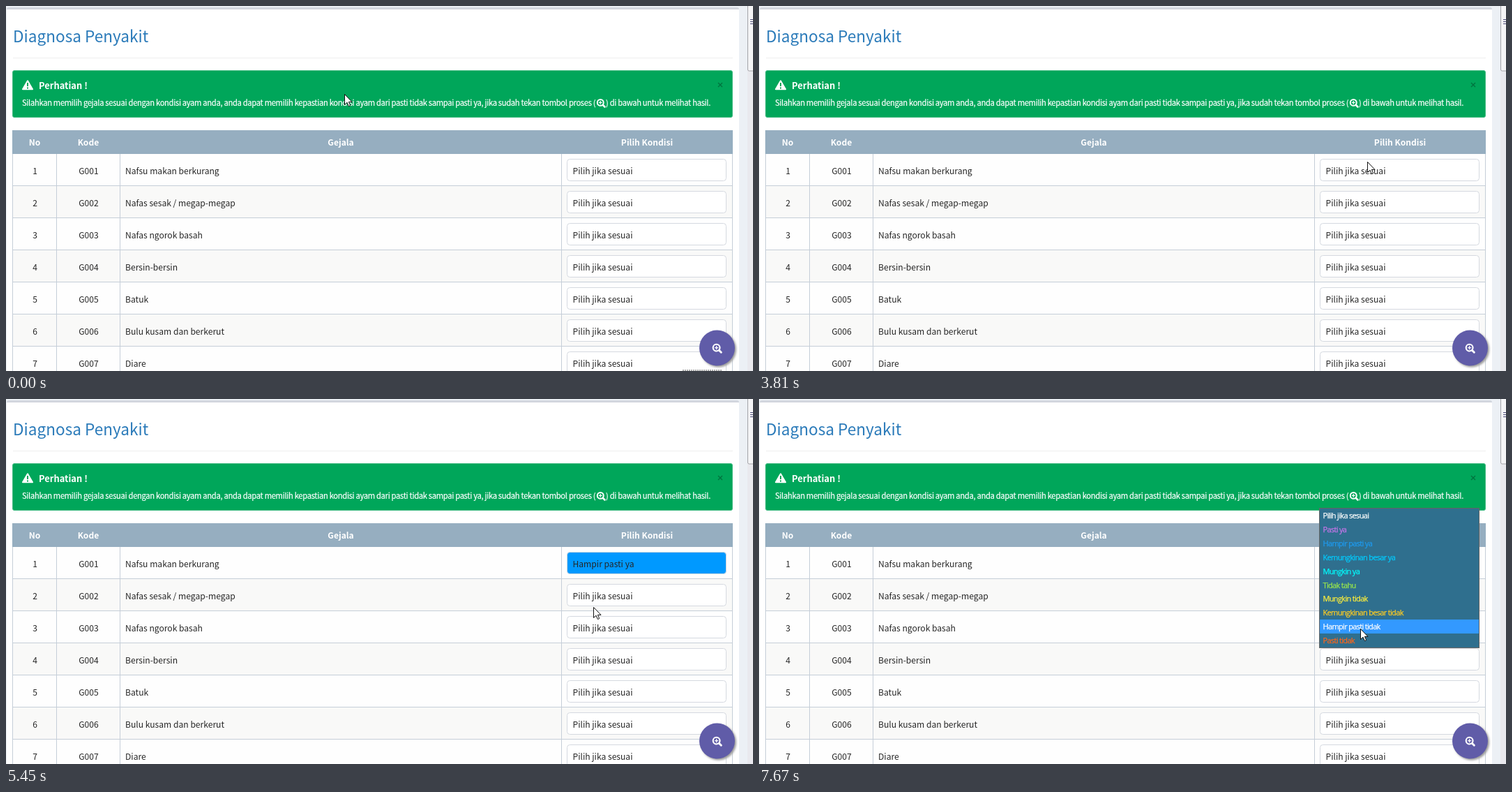
Animation of 1071 by 523 pixels, one loop 7990 ms. Source, as an HTML page:

```html
<!DOCTYPE html>
<html lang="id">
<head>
<meta charset="utf-8">
<title>Diagnosa</title>
<style>
html, body { margin: 0; width: 100%; height: 100%; overflow: hidden; background: #ecf0f5; }
svg { display: block; width: 100%; height: 100%; }
text { font: 12.1px "Noto Sans CJK JP", "Noto Sans CJK SC", "Noto Sans", sans-serif; fill: #262626; white-space: pre; }
.title { font-size: 22.6px; fill: #2a7ab9; }
.head { font-weight: bold; fill: #fff; }
.mid { text-anchor: middle; }
.note { font-size: 11.2px; letter-spacing: -.315px; fill: #fff; stroke: #fff; stroke-width: .2px; }
.opt { font: 11px "Open Sans", "Noto Sans", sans-serif; letter-spacing: -.67px; fill: currentColor; stroke: currentColor; stroke-width: .25px; }
</style>
</head>
<body>
<svg id="stage" viewBox="0 0 1071 523" xmlns="http://www.w3.org/2000/svg"></svg>
<script>
const LOOP = 7990, STEP = 78, ROW = 46, OPT = 19.9;
const NONE = 'Pilih jika sesuai';
const headings = ['No', 'Kode', 'Gejala', 'Pilih Kondisi'];
const edges = [9, 72, 163, 796, 1041];
const symptoms = ['Nafsu makan berkurang', 'Nafas sesak / megap-megap', 'Nafas ngorok basah',
  'Bersin-bersin', 'Batuk', 'Bulu kusam dan berkerut', 'Diare'];
const options = [
  [NONE, '#fff'], ['Pasti ya', '#c776ea'], ['Hampir pasti ya', '#1e9bf0'],
  ['Kemungkinan besar ya', '#0cf'], ['Mungkin ya', '#0ff'], ['Tidak tahu', '#9be84a'],
  ['Mungkin tidak', '#ffef3a'], ['Kemungkinan besar tidak', '#fc2'],
  ['Hampir pasti tidak', '#f93'], ['Pasti tidak', '#ff661a']];

// Pointer glides: start, duration, destination
const glides = [
  [70, 0, 418, 129], [290, 0, 432, 122],
  [1230, 470, 361, 228], [1700, 300, 437, 231],
  [2070, 330, 802, 237], [2620, 260, 240, 236], [3250, 560, 872, 223],
  [4360, 156, 875, 269], [4516, 234, 842, 298],
  [5450, 290, 850, 273], [6060, 340, 859, 404], [6400, 250, 857, 382],
  [7120, 0, 845, 379], [7270, 250, 862, 329]];

const lists = [{ from: 4010, to: 5450, top: 251 }, { from: 6850, to: LOOP, top: 157 }];

const rect = (x, y, w, h, fill, more = '') =>
  `<rect x="${x}" y="${y}" width="${w}" height="${h}" fill="${fill}" ${more}/>`;
const text = (x, y, str, cls = '', more = '') =>
  `<text x="${x}" y="${y}" class="${cls}" ${more}>${str}</text>`;
const path = (d, more) => `<path d="${d}" ${more}/>`;
const zoomIcon = (x, y, s) => `<g transform="translate(${x} ${y}) scale(${s})" fill="none" stroke="#fff">
  <circle cx="6" cy="6" r="4.8" stroke-width="2.1"/>
  <path d="M9.8 9.8 12.6 12.6" stroke-width="2.8" stroke-linecap="round"/>
  <path d="M3.5 6h5M6 3.5v5" stroke-width="1.3"/></g>`;

function page() {
  let s = rect(0, 0, 1071, 523, '#ecf0f5')
    + rect(1, 2, 1050, 530, '#d2d6de', 'rx="3"')
    + rect(1, 5, 1050, 518, '#fff')
    + rect(1063, 0, 8, 523, '#e9e9ee')
    + rect(1063.5, -4, 12, 97, '#f4f4f6', 'stroke="#a3a3a8" rx="2"')
    + path('M1067 19.5h4M1067 22.5h4M1067 25.5h4', 'stroke="#4c4c78"')
    + text(10, 52, 'Diagnosa Penyakit', 'title')
    + rect(10, 74, 1032, 1, '#eee')
    + rect(9.5, 92.5, 1032, 67, '#00a65a', 'stroke="#45bd86" rx="2.5"')
    + path('M31 107.2 38 119.3H24Z', 'fill="#fff" stroke="#fff" stroke-width="2" stroke-linejoin="round"')
    + path('M31 110v5M31 116.5v2', 'stroke="#00a65a" stroke-width="2"')
    + text(47, 119, 'Perhatian !', 'head', 'style="font-size:12.9px"')
    + path('M1021 110l6 6m0-6l-6 6', 'stroke="#00743f" stroke-width="1.4"')
    + text(23, 143, 'Silahkan memilih gejala sesuai dengan kondisi ayam anda, anda dapat memilih kepastian kondisi ayam dari pasti tidak sampai pasti ya, jika sudah tekan tombol proses (', 'note')
    + zoomIcon(846.7, 132.8, .93)
    + text(860, 143, ') di bawah untuk melihat hasil.', 'note')
    + rect(9, 178, 1033, 34, '#96aec0');
  headings.forEach((t, i) => s += text((edges[i] + edges[i + 1] + 1) / 2, 200, t, 'head mid'));
  symptoms.forEach((name, i) => {
    const y = 212 + i * ROW;
    s += rect(9, y, 1033, ROW, i % 2 ? '#f9f9f8' : '#fefefe')
      + rect(9, y + ROW - 1, 1033, 1, '#c5ced8')
      + text(41.5, y + 29, i + 1, 'mid')
      + text(118.5, y + 29, 'G00' + (i + 1), 'mid')
      + text(171, y + 29, name)
      + rect(804.5, y + 7.5, 228, 31, '#fff', `stroke="#d5d9e0" rx="4" id="box${i}"`)
      + text(812.5, y + 29, NONE, '', `id="val${i}"`);
  });
  edges.forEach(x => s += rect(x, 212, 1, 311, '#c5ced8'));
  return s + path('M970 522h57', 'id="dots" stroke="#555" stroke-dasharray="2 1"')
    + '<circle cx="1021.5" cy="492" r="25.5" fill="#999" filter="url(#soft)"/>'
    + '<circle cx="1019.5" cy="490" r="25.5" fill="#605ca8"/>'
    + zoomIcon(1012.5, 483.5, 1.02);
}

const listMarkup = () => '<g id="list">'
  + rect(.5, -.5, 229, 200, '#2f6f8e', 'stroke="#646464"')
  + rect(1, 0, 228, 20, '#39f', 'id="bar"')
  + options.map(([t], i) => text(5.5, 14 + Math.round(i * OPT), t, 'opt')).join('')
  + '</g>';

const stage = document.getElementById('stage');
stage.innerHTML = '<defs><filter id="soft" x="-30%" y="-30%" width="160%" height="160%"><feGaussianBlur stdDeviation="1.5"/></filter></defs>'
  + page() + listMarkup()
  + path('M.5 .5V15.5L4 12.2 6.4 17.6 8.7 16.6 6.4 11.4H11Z', 'id="arrow" fill="#fff" stroke="#111"')
  + path('M-3 -6.5h2.5l.5 .5 .5-.5H3M0-6V6M-3 6.5h2.5l.5-.5 .5 .5H3', 'id="beam" fill="none" stroke="#111"');

const [arrow, beam, list, bar, dots, box, val] =
  ['arrow', 'beam', 'list', 'bar', 'dots', 'box0', 'val0'].map(id => document.getElementById(id));
const labels = [...list.querySelectorAll('text')];
const show = (el, on) => el.setAttribute('visibility', on ? 'visible' : 'hidden');
const place = (el, x, y) => el.setAttribute('transform', `translate(${x} ${y})`);
const easeOut = u => 1 - (1 - u) ** 3;

function pointer(t) {
  let x = 485, y = 126;
  for (const [start, span, toX, toY] of glides) {
    if (t < start) break;
    const held = Math.floor((t - start) / STEP + .25) * STEP;
    const u = held >= span ? 1 : easeOut(held / span);
    x += (toX - x) * u;
    y += (toY - y) * u;
  }
  return [Math.round(x), Math.round(y)];
}

function draw(t) {
  const [x, y] = pointer(t);
  const overText = x > 168 && x < 308 && y > 225 && y < 250;
  show(arrow, !overText);
  show(beam, overText);
  place(arrow, x, y);
  place(beam, x + .5, y);

  const open = lists.find(l => t >= l.from && t < l.to);
  show(list, open);
  if (open) {
    place(list, 803, open.top);
    const row = Math.floor((y - open.top) / OPT);
    const active = row in options ? row : 0;
    bar.setAttribute('y', Math.round(active * OPT));
    labels.forEach((el, i) => el.style.color = i === active ? '#fff' : options[i][1]);
  }

  const chosen = t >= 5450;
  box.setAttribute('fill', chosen ? '#09f' : '#fff');
  val.textContent = chosen ? options[2][0] : NONE;
  show(dots, t < 3250);
}

const start = performance.now();
function tick() {
  draw((performance.now() - start) % LOOP);
  requestAnimationFrame(tick);
}
tick();
</script>
</body>
</html>
```
